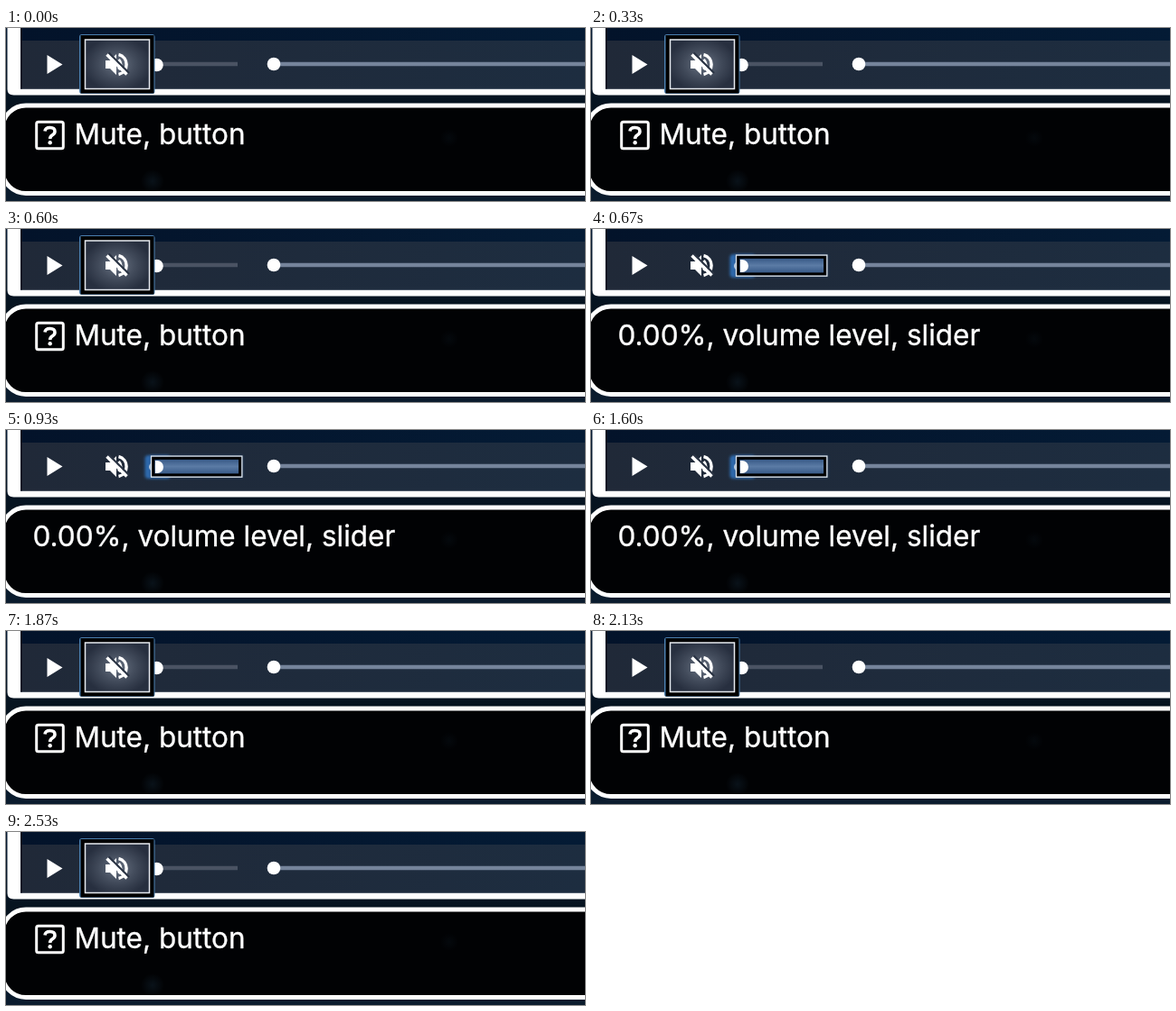
Animation, 640 px wide and 192 px high, one loop 2590 ms. Source, as an HTML page:

```html
<!DOCTYPE html>
<html lang="en">
<head>
<meta charset="utf-8">
<style>
  html, body { margin: 0; width: 100%; height: 100%; overflow: hidden; background: #071626; }
  svg { display: block; width: 100vw; height: 100vh; }
  text { font: 31.5px Inter, "Liberation Sans", sans-serif; fill: #fff; stroke: #fff; stroke-width: .35px; }
</style>
</head>
<body>
<svg viewBox="0 0 640 192" preserveAspectRatio="none">
  <defs>
    <linearGradient id="page" x2="0" y2="1">
      <stop offset="0" stop-color="#061a33"/>
      <stop offset=".45" stop-color="#06131f"/>
      <stop offset="1" stop-color="#0b1c2e"/>
    </linearGradient>
    <linearGradient id="video">
      <stop offset="0" stop-color="#03132a"/>
      <stop offset="1" stop-color="#041b35"/>
    </linearGradient>
    <linearGradient id="bar">
      <stop offset="0" stop-color="#202938"/>
      <stop offset="1" stop-color="#1d2d40"/>
    </linearGradient>
    <radialGradient id="lit">
      <stop offset="0" stop-color="#667080"/>
      <stop offset=".55" stop-color="#414a5a"/>
      <stop offset="1" stop-color="#272f3f"/>
    </radialGradient>
    <linearGradient id="fill" x2="0" y2="1">
      <stop offset="0" stop-color="#2a4d7c"/>
      <stop offset=".5" stop-color="#5b7ba5"/>
      <stop offset="1" stop-color="#2a4d7c"/>
    </linearGradient>
    <radialGradient id="spot">
      <stop offset="0" stop-color="#2a5270" stop-opacity=".4"/>
      <stop offset="1" stop-color="#2a5270" stop-opacity="0"/>
    </radialGradient>
    <filter id="blur" x="-50%" y="-80%" width="200%" height="260%">
      <feGaussianBlur stdDeviation="1.8"/>
    </filter>
  </defs>

  <rect width="640" height="192" fill="url(#page)"/>
  <path d="M1.500 0V68Q1.500 74.500 8.500 74.500H640V0Z" fill="#fff"/>
  <rect x="16" width="624" height="67.500" fill="url(#video)"/>
  <rect x="16" y="14" width="624" height="53.500" fill="url(#bar)"/>
  <rect x="16" width="2" height="67.500" fill="#0a111d" opacity=".7"/>

  <rect x="-4" y="86" width="700" height="97.500" rx="26" fill="#010204" stroke="#fff" stroke-width="4.800"/>
  <circle cx="162" cy="170" r="13" fill="url(#spot)" opacity=".5"/>
  <circle cx="490" cy="122" r="10" fill="url(#spot)" opacity=".2"/>

  <path d="M45.500 30L62.500 40.500L45.500 51Z" fill="#fff"/>
  <path d="M296 40H640" stroke="#75849b" stroke-width="4.500"/>
  <circle cx="296" cy="40" r="7.300" fill="#fff"/>

  <g id="volume">
    <path d="M166 40H256" stroke="#4a5363" stroke-width="4.500"/>
    <circle cx="166.500" cy="41" r="7.300" fill="#fff"/>
  </g>

  <g id="muteFocus">
    <rect x="82" y="8" width="81.500" height="64" rx="2" fill="none" stroke="#4c80b0" stroke-width="2"/>
    <rect x="85" y="10.500" width="76" height="59.500" fill="url(#lit)" stroke="#000" stroke-width="5"/>
    <rect x="87.500" y="13" width="71" height="54.500" fill="none" stroke="#e6eaf0" stroke-width="1.500"/>
  </g>

  <g id="sliderFocus">
    <rect x="153.500" y="28" width="28" height="26" rx="4" fill="#2f6aae" filter="url(#blur)"/>
    <rect x="159" y="28" width="103" height="25" rx="2" fill="#29507f" filter="url(#blur)" opacity=".5"/>
    <rect x="161" y="29.500" width="99.500" height="22" fill="url(#fill)"/>
    <path d="M165 34H167A7 7 0 0 1 167 48H165Z" fill="#fff"/>
    <path d="M159.500 37Q157 41 159.500 45Z" fill="#fff"/>
    <rect x="162.700" y="31.200" width="96" height="18.800" fill="none" stroke="#000" stroke-width="3.200"/>
    <rect x="160.500" y="29" width="100.400" height="23.200" fill="none" stroke="#dfe5ec" stroke-width="1.300"/>
  </g>

  <g id="speaker">
    <path d="M110 36H115L122 29V52L115 45H110Z" fill="#fff"/>
    <g fill="none" stroke="#fff" stroke-width="3.400">
      <path d="M124.500 35Q129 40.500 124.500 46"/>
      <path d="M124.500 29.500C136 32 136 49 124.500 51.500"/>
    </g>
    <path d="M113.500 27.500L136 50" stroke="#2b3444" stroke-width="2.400"/>
    <path d="M111.500 29.500L133.500 51.500" stroke="#fff" stroke-width="3.400"/>
  </g>

  <g id="muteText">
    <rect x="33.700" y="104.200" width="29.600" height="29.600" rx="2" fill="none" stroke="#fff" stroke-width="3"/>
    <path d="M43 114.500Q43.500 110.500 48.500 110.500Q54 110.500 54 114.700Q54 117.200 51 119Q48.700 120.500 48.700 123" fill="none" stroke="#fff" stroke-width="3.600"/>
    <circle cx="48.700" cy="127.300" r="2.200" fill="#fff"/>
    <text x="75.500" y="128.500">Mute, button</text>
  </g>
  <text id="sliderText" x="29.500" y="128.500">0.00%, volume level, slider</text>
</svg>
<script>
  const LOOP = 2590, SLIDER_ON = 670, SLIDER_OFF = 1670;
  const show = (id, on) => {
    document.getElementById(id).style.display = on ? "" : "none";
  };

  function draw(ms) {
    const t = ms % LOOP;
    const slider = t >= SLIDER_ON && t < SLIDER_OFF;
    for (const id of ["muteFocus", "muteText", "volume"]) show(id, !slider);
    for (const id of ["sliderFocus", "sliderText"]) show(id, slider);
  }

  const start = performance.now();
  function tick() {
    draw(performance.now() - start);
    requestAnimationFrame(tick);
  }
  draw(0);
  requestAnimationFrame(tick);
</script>
</body>
</html>
```
